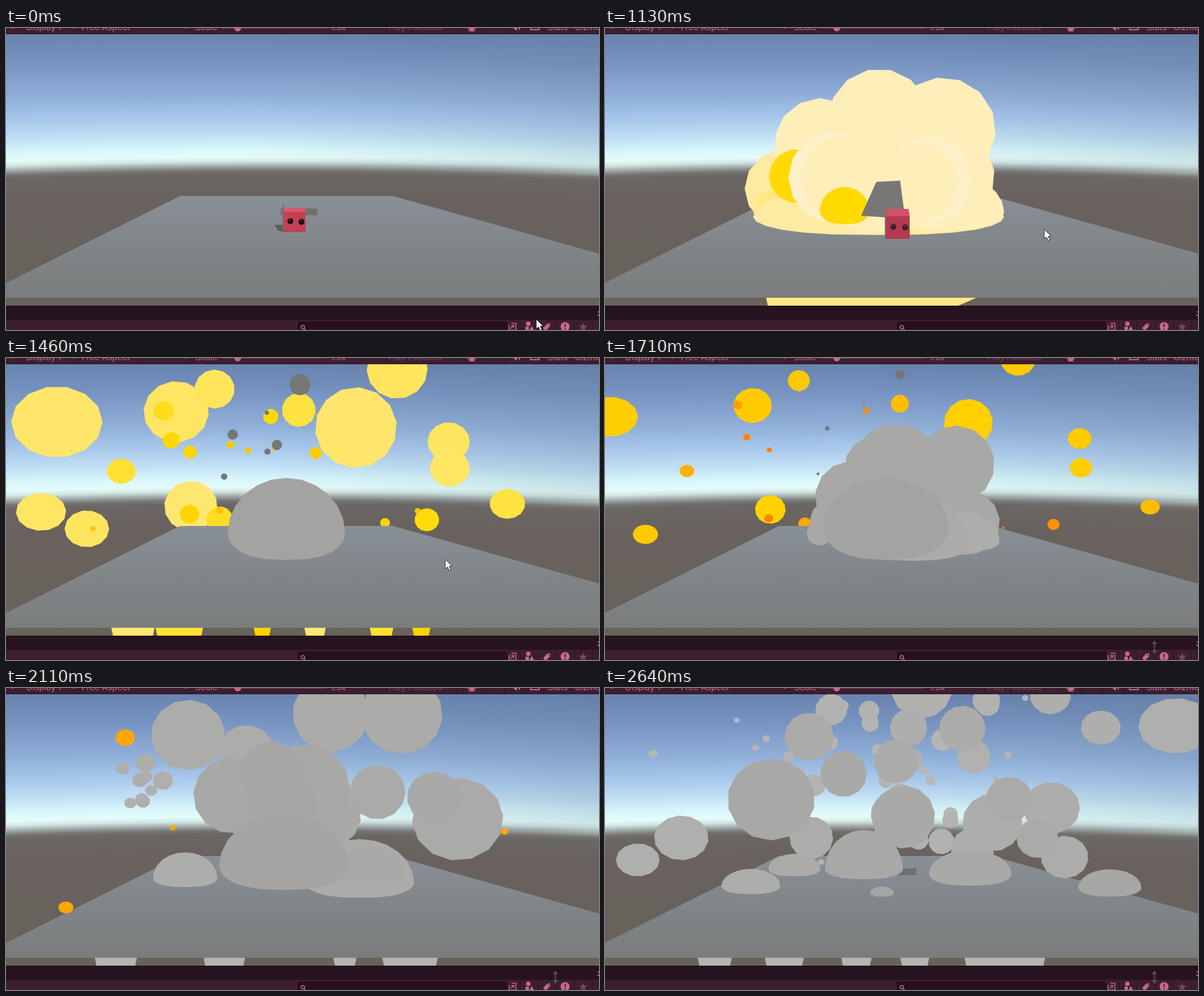
Animation of 1049x534 px, one loop 2770 ms. Source, as an HTML page with a canvas:

```html
<!DOCTYPE html>
<html lang="en">
<head>
<meta charset="utf-8">
<title>Cube explosion</title>
<style>
html, body { margin: 0; width: 100%; height: 100%; overflow: hidden; background: #26131f; }
canvas { display: block; }
</style>
</head>
<body>
<canvas id="stage" width="1049" height="534"></canvas>
<script>
const W = 1049, H = 534, TOP = 11, BOTTOM = 491, LOOP = 2770, STEP = 65.9;
const stage = document.getElementById('stage');
let ctx = stage.getContext('2d');

const mix = (a, b, u) => a + (b - a) * u;
const clamp = u => Math.max(0, Math.min(1, u));
const ease = u => u * u * (3 - 2 * u);
const gray = v => `rgb(${Math.round(v)},${Math.round(v)},${Math.round(v) - 2})`;

function rand(i, salt) {
  const v = Math.sin(i * 127.1 + salt * 311.7) * 43758.5453;
  return v - Math.floor(v);
}

// Linear interpolation through rows of [step, ...values].
function at(keys, k) {
  if (k <= keys[0][0]) return keys[0].slice(1);
  for (let i = 1; i < keys.length; i++) {
    const a = keys[i - 1], b = keys[i];
    if (k <= b[0]) return a.slice(1).map((v, j) => mix(v, b[j + 1], (k - a[0]) / (b[0] - a[0])));
  }
  return keys[keys.length - 1].slice(1);
}

const HEAT = [[0, 255, 240, 192], [1, 254, 232, 127], [2, 254, 226, 64],
  [3, 255, 216, 0], [4, 255, 188, 0], [5, 255, 136, 0], [6, 250, 80, 0]];
const heat = h => `rgb(${at(HEAT, h).map(Math.round)})`;

function poly(points, color) {
  ctx.beginPath();
  points.forEach(([x, y]) => ctx.lineTo(x, y));
  ctx.closePath();
  ctx.fillStyle = color;
  ctx.fill();
}

function rect(x, y, w, h, color) {
  ctx.fillStyle = color;
  ctx.fillRect(x, y, w, h);
}

function disc(x, y, r, color) {
  ctx.beginPath();
  ctx.arc(x, y, r, 0, Math.PI * 2);
  ctx.fillStyle = color;
  ctx.fill();
}

// Faceted ball, widened towards the sides by the camera's perspective.
function ball(x, y, r, color, turn = 0, sides = 14) {
  if (r <= 0.3) return;
  const e = 0.18 * ((x - 524) / 524) ** 2;
  poly(Array.from({ length: sides }, (_, i) => {
    const a = turn + i * 2 * Math.PI / sides;
    return [x + Math.cos(a) * r * (1 + e), y + Math.sin(a) * r * (1 - e)];
  }), color);
}

// Ball cut off by the floor: round above, flatter below.
function dome(x, y, w, up, down, color) {
  poly(Array.from({ length: 24 }, (_, i) => {
    const a = i * Math.PI / 12, c = Math.cos(a), s = Math.sin(a);
    return s <= 0
      ? [x + c * w, y + s * up]
      : [x + Math.sign(c) * Math.abs(c) ** 0.75 * w, y + s * down];
  }), color);
}

// Growth and decay of a burst, 0 to 1.
function life(k, [born, peak, gone]) {
  if (k < born || k >= gone) return 0;
  return Math.sqrt(k < peak ? (k - born) / (peak - born) : 1 - (k - peak) / (gone - peak));
}

// Random balls filling a box, denser towards its middle.
function scatter(count, salt, cx, cy, reachX, reachY, small, large) {
  return Array.from({ length: count }, (_, i) => [
    cx + reachX * (rand(i, salt) + rand(i, salt + 1) - 1),
    cy + reachY * (rand(i, salt + 2) * 2 - 1),
    mix(small, large, rand(i, salt + 3) ** 2)
  ]);
}

// Balls that swell while flying outwards, then shrink.
function burst(balls, k, span, from, color) {
  const size = life(k, span);
  if (!size) return;
  const spread = k < span[1] ? mix(from, 1, size) : 1 + 0.02 * (k - span[1]);
  balls.forEach(([x, y, r], i) =>
    ball(mix(500, x, spread), mix(270, y, spread), r * size, color(i / balls.length), i * 1.7));
}

// Backdrop, drawn once
const SKY = [[11, '#6883ae'], [60, '#7793c1'], [120, '#90afd8'], [160, '#a9c9ec'], [190, '#c1dff4'],
  [212, '#d7f5fb'], [228, '#e4fcfa'], [236, '#d2e6e4'], [245, '#9ca5a4'], [252, '#777573'],
  [258, '#6b6764'], [300, '#69615d'], [490, '#67625a']];

function drawSky() {
  for (let x = 0; x < W; x += 8) {
    const bend = 11 * ((x - 470) / 540) ** 2, g = ctx.createLinearGradient(0, TOP, 0, 490);
    SKY.forEach(([y, color]) => {
      const shift = bend * clamp((y - TOP) / 240) * clamp((490 - y) / 100);
      g.addColorStop((y - TOP + shift) / 479, color);
    });
    rect(x, TOP, 8, BOTTOM - TOP, g);
  }
  const shade = ctx.createLinearGradient(450, 0, W, 0);
  shade.addColorStop(0, 'rgba(85,110,130,0)');
  shade.addColorStop(1, 'rgba(85,110,130,.16)');
  rect(450, TOP, W - 450, 242, shade);
}

function drawPlane() {
  const g = ctx.createLinearGradient(0, 297, 0, 477);
  g.addColorStop(0, '#889097');
  g.addColorStop(0.5, '#808588');
  g.addColorStop(1, '#7b7d7d');
  poly([[308, 297], [684, 297], [W, 399], [W, 477], [0, 477], [0, 451]], g);
  rect(486, 319, 65, 12, '#716f6d');
}

const PINK = '#c5678f', DIM = '#774359', BAR = '#3d1e2f', LINE = '#26131f';

function label(text, x, color = PINK) {
  ctx.fillStyle = color;
  ctx.font = '15px Inter, sans-serif';
  ctx.fillText(text, x, 4);
}

function drawTopBar() {
  rect(0, 0, W, TOP, BAR);
  rect(0, 10, W, 1, LINE);
  [23, 128, 326, 672, 808, 840, 882, 917, 951, 1000].forEach(x => rect(x, 0, 1, 10, LINE));
  label('Display 1', 36);
  label('Free Aspect', 134);
  label('Scale', 335);
  label('1.5x', 574);
  label('Play Focused', 677, DIM);
  label('Stats', 958);
  label('Gizmos', 1006);
  rect(382, 0, 184, 1, DIM);
  disc(410, 0, 6, PINK);
  [11, 118, 316].forEach(x => rect(x, 0, 3, 1, PINK));
  disc(824, 1, 5, PINK);
  rect(816, 1, 16, 1, PINK);
  rect(818, 5, 12, 1, PINK);
  poly([[897, 0], [904, 0], [904, 5]], PINK);
  rect(907, 0, 2, 3, PINK);
  rect(927, 0, 17, 4, PINK);
  rect(929, 0, 13, 2, BAR);
}

function drawBottomBar() {
  rect(0, BOTTOM, W, H - BOTTOM, LINE);
  rect(0, BOTTOM, W, 1, '#180b13');
  rect(0, 516, W, 18, BAR);
  ctx.beginPath();
  ctx.roundRect(516, 519, 371, 24, 4);
  ctx.fillStyle = '#25101b';
  ctx.fill();
  [909, 940, 972, 1005, 1037].forEach(x => rect(x, 518, 1, 16, LINE));
  ctx.strokeStyle = PINK;
  ctx.lineWidth = 1.6;
  ctx.stroke(new Path2D('M528 529a3 3 0 1 0-6 0a3 3 0 1 0 6 0M527 531l4 4' +
    'M894 522h8v12h-12v-9M893 531l5-5h-4m4 0v4'));
  disc(924, 523, 4, PINK);
  rect(919, 528, 6, 6, PINK);
  poly([[926, 534], [930, 527], [934, 534]], PINK);
  poly([[950, 531], [957, 523], [963, 522], [962, 528], [955, 535]], PINK);
  disc(960, 525, 1, BAR);
  disc(989, 528, 8, PINK);
  rect(988, 523, 2, 6, BAR);
  rect(988, 531, 2, 2, BAR);
  poly(Array.from({ length: 10 }, (_, i) => {
    const a = i * Math.PI / 5, r = i % 2 ? 3.3 : 8;
    return [1021 + Math.sin(a) * r, 529 - Math.cos(a) * r];
  }), '#7d4560');
  rect(1046, 507, 3, 2, PINK);
  rect(1047, 501, 2, 2, PINK);
}

const backdrop = document.createElement('canvas');
backdrop.width = W;
backdrop.height = H;
const screen = ctx;
ctx = backdrop.getContext('2d');
drawSky();
drawPlane();
poly([[488, 319], [490, 311], [494, 319]], '#777878');
drawTopBar();
drawBottomBar();
ctx = screen;

// Cube: step, left, top, front top, right, bottom
const CUBE = [[8, 491, 318, 325, 530, 361], [11, 489, 313, 320, 526, 356], [17, 497, 320, 333, 539, 373]];

function drawCube(k) {
  const [l, t, f, r, b] = at(CUBE, k), lit = k < 14;
  if (lit) poly([[l - 16, b - 13], [l, b - 13], [l, b], [l - 10, b - 3]], k > 8 ? '#585a6b' : '#605c5b');
  poly([[l - 2, t + 2], [l, f], [l, b], [l - 2, b - 4]], '#777273');
  poly([[l + 1, t], [r - 2, t], [r, f], [l, f]], lit ? '#d75970' : '#d65069');
  rect(l, f, r - l, b - f, lit ? '#c53f55' : '#b43a50');
  [[0.31, 0.46], [0.81, 0.49]].forEach(([u, v]) => {
    const x = mix(l, r, u), y = mix(f, b, v);
    disc(x, y, 5.3, lit ? '#1b1118' : '#431d29');
    disc(x - 1, y - 2, 1.5, '#594650');
  });
}

// First flash: a heap of pale balls around a dark gap
const CREAM = '#feeeba', GLOW = '#fef0c8', YELLOW = '#ffda00', SOOT = '#777777';

function drawFlash(k) {
  const size = k <= 17 ? (k - 13) / 4 : 1 - ((k - 17) / 4) ** 2;
  if (size <= 0) return;
  ctx.save();
  ctx.translate(485, 350);
  ctx.scale(size, size);
  ctx.translate(-485, -350);
  ball(322, 284, 73, '#feeaa0');
  dome(310, 324, 48, 42, 14, '#ffe782');
  dome(484, 334, 222, 60, 32, '#feeba2');
  dome(600, 325, 106, 70, 33, CREAM);
  [[485, 162, 90], [598, 180, 93], [382, 204, 81], [600, 264, 89], [470, 265, 100]]
    .forEach(([x, y, r], i) => ball(x, y, r, CREAM, i));
  ball(340, 262, 49, YELLOW);
  ball(407, 264, 82, GLOW);
  ball(424, 266, 77, CREAM);
  ball(574, 268, 76, GLOW);
  ball(557, 272, 67, CREAM);
  dome(424, 323, 44, 42, 24, YELLOW);
  poly([[453, 332], [480, 272], [522, 270], [531, 337]], SOOT);
  ctx.restore();
}

// Fireballs: the large ones placed, the small ones scattered
const FIRE = [[90, 113, 72], [301, 95, 56], [369, 55, 35], [619, 123, 72], [692, 20, 53], [783, 148, 36],
  [785, 195, 34], [887, 258, 29], [62, 272, 39], [143, 302, 36], [327, 262, 46], [518, 92, 30],
  ...scatter(20, 4, 470, 180, 420, 130, 4, 24)];

function drawFire(k) {
  if (k < 18 || k > 30) return;
  const age = k - 22, out = age < 0 ? mix(0.35, 1, Math.sqrt((k - 17) / 5)) : 1 + 0.05 * age;
  const rise = age < 0 ? out : 1 + 0.025 * age;
  FIRE.forEach(([x, y, r], i) => {
    const size = age < 0 ? r * (1 + 0.08 * age) : r * (1 - 0.09 * age) - 0.8 * age;
    const h = 1.2 + 2.6 * clamp(1 - r / 36) + 0.6 * rand(i, 9);
    const fall = age > 0 ? 0.6 * age * age : 0;
    ball(mix(500, x, out), mix(300, y, rise) + fall, size,
      heat(age < 0 ? h * (k - 16) / 6 : h + 0.5 * age), i);
  });
}

const DEBRIS = [[520, 47, 19], ...scatter(6, 21, 450, 160, 130, 80, 4, 10)];
const EMBERS = [[211, 88, 16], [106, 388, 12], [295, 247, 5], [882, 254, 6]];

// Smoke, back to front: the large puffs placed, the small ones scattered
const CLOUD = [[515, 195, 79], [478, 192, 54], [620, 188, 69], [436, 246, 64], [402, 288, 39],
  [379, 310, 22], [640, 291, 58], [560, 270, 80]];
const PLUME = [...scatter(10, 31, 260, 200, 70, 75, 10, 30), [425, 115, 50], [322, 83, 64], [575, 45, 68],
  [700, 47, 71], [657, 184, 49], [799, 232, 77], [758, 193, 47], [570, 225, 58], [400, 190, 68],
  [530, 178, 79], [470, 150, 56], [490, 207, 61]];
const DRIFT = [...scatter(30, 44, 500, 160, 450, 150, 5, 22), ...scatter(10, 53, 530, 150, 220, 140, 18, 38),
  [560, 0, 54], [135, 265, 44], [58, 304, 34], [1010, 67, 58], [877, 70, 33], [788, 13, 35], [537, 70, 33],
  [790, 212, 48], [685, 238, 52], [650, 285, 38], [813, 299, 40], [365, 265, 38], [361, 86, 43], [632, 72, 41],
  [515, 130, 39], [715, 197, 41], [765, 266, 36], [422, 152, 41], [528, 228, 56], [294, 197, 75]];

// Smoke resting on the floor: x, y, half width
const MOUNDS = [
  { span: [22, 26, 31], rise: 0.9, rows: [[638, 325, 60], [545, 331, 98]] },
  { span: [26, 32, 40], rise: 0.8, rows: [[317, 336, 57], [626, 344, 96], [643, 330, 62]] },
  { span: [32, 40, 48], rise: 0.58,
    rows: [[258, 350, 52], [335, 320, 46], [646, 329, 73], [893, 353, 56], [490, 363, 21]] }];

// Central mound: step, x, y, half width, rise, drop, tone
const CORE = [[17, 496, 330, 10, 20, 10, 130], [22, 496, 310, 104, 98, 47, 163], [26, 497, 300, 111, 88, 57, 163],
  [32, 492, 315, 115, 93, 42, 164], [40, 458, 320, 69, 69, 18, 168]];

function drawMounds(k) {
  MOUNDS.forEach(({ span, rise, rows }) => rows.forEach(([x, y, w], i) => {
    const size = w * life(k, span);
    if (size) dome(x, y, size, size * rise, size * 0.28, gray(173 - 2 * i));
  }));
  if (k > 17) {
    const [x, y, w, up, down, tone] = at(CORE, k);
    dome(x, y, w, up, down, gray(tone));
  }
}

// Undersides of balls showing below the plane's front edge
function drawBelow(k, from, to, count, salt, color) {
  if (k < from || k > to) return;
  for (let i = 0; i < count; i++) {
    const x = mix(140, 830, (i + 0.6 * rand(i, salt)) / count);
    const w = mix(14, 105, rand(i, salt + 1));
    poly([[x, 477], [x + w, 477], [x + w - 3, BOTTOM], [x + 3, BOTTOM]], color(i));
  }
}

function drawPointer(k) {
  if (k > 25) {
    const color = '#604855';
    rect(971, 504, 2, 15, color);
    poly([[967, 506], [972, 500], [977, 506]], color);
    poly([[967, 517], [972, 523], [977, 517]], color);
    return;
  }
  const reach = ease(clamp(k / 8)), leave = ease(clamp((k - 22) / 4));
  const x = mix(mix(938, 777, reach), 972, leave), y = mix(mix(515, 356, reach), 511, leave);
  poly([[0, 0], [0, 17], [4, 13.5], [7, 20], [10, 18.7], [7, 12.5], [12, 12]].map(([u, v]) => [x + u, y + v]), '#fff');
  ctx.strokeStyle = '#222';
  ctx.lineWidth = 1;
  ctx.stroke();
}

function drawExplosion(k) {
  drawFire(k);
  drawPlane();
  drawBelow(k, 20, 24, 6, 61, i => heat(1.2 + i % 3));
  drawBelow(k, 30, 36, 4, 71, () => gray(180));
  drawBelow(k, 37, 40, 6, 81, () => gray(180));
  if (k >= 16 && k < 20) poly([[285, 477], [657, 477], [625, BOTTOM], [288, BOTTOM]], '#ffe785');
  drawFlash(k);
  burst(EMBERS, k, [26, 32, 38], 0.8, () => heat(4.4));
  burst(DEBRIS, k, [18, 22, 27], 0.6, () => SOOT);
  burst(CLOUD, k, [22, 26, 31], 0.5, () => gray(168));
  burst(PLUME, k, [26, 32, 40], 0.5, u => gray(mix(177, 166, u)));
  burst(DRIFT, k, [32, 40, 48], 0.8, u => gray(mix(182, 168, u * u)));
  drawMounds(k);
}

function draw(k) {
  ctx.drawImage(backdrop, 0, 0);
  ctx.save();
  ctx.beginPath();
  ctx.rect(0, TOP, W, BOTTOM - TOP);
  ctx.clip();
  if (k > 13) drawExplosion(k);
  if (k < 18) drawCube(k);
  ctx.restore();
  drawPointer(k);
}

const start = performance.now();
function tick() {
  const t = (performance.now() - start) % LOOP;
  draw(Math.min(40, Math.floor((t + 4) / STEP)));
  requestAnimationFrame(tick);
}
tick();
</script>
</body>
</html>
```
